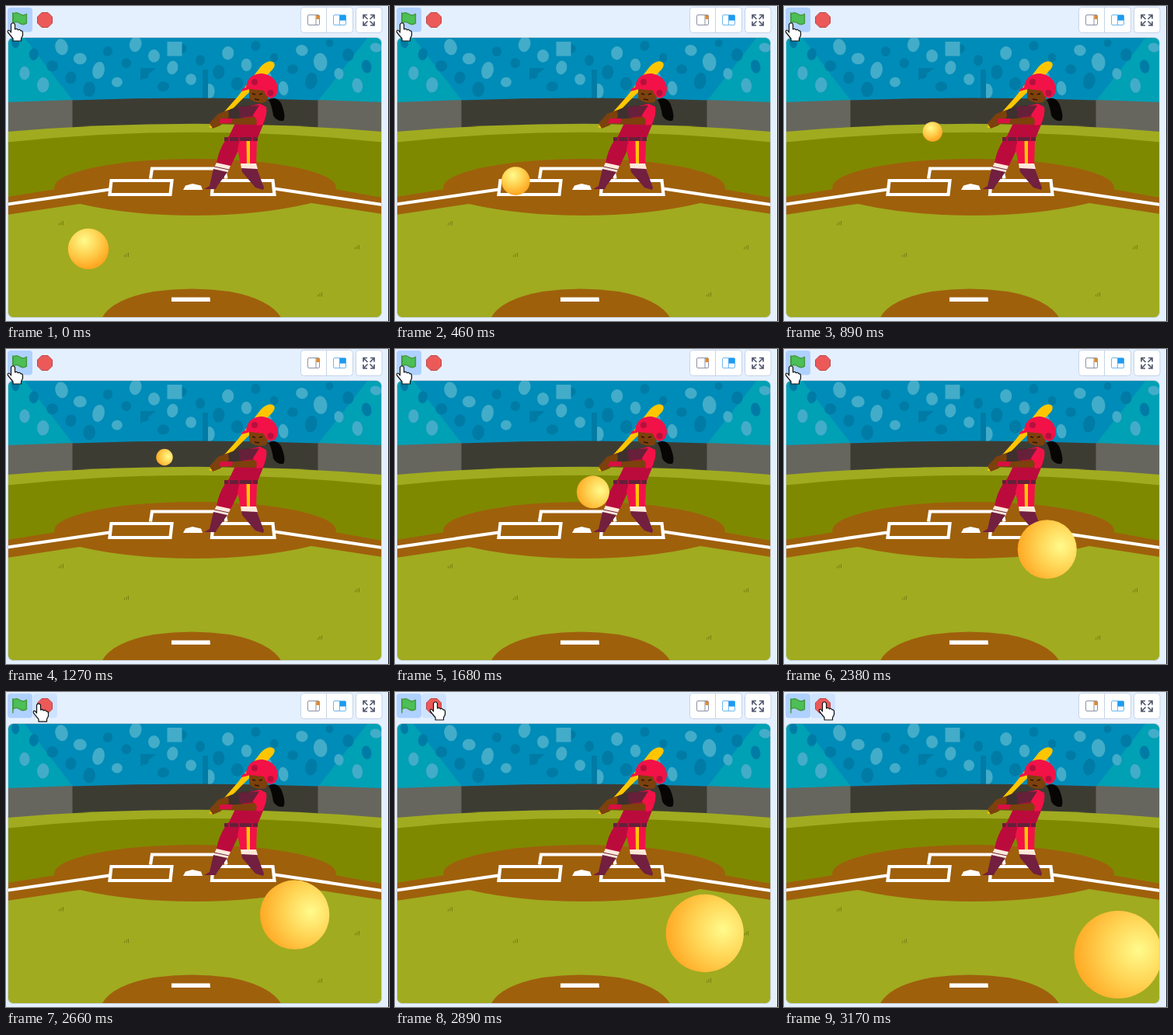
These frames come from a looping animation (493x406 px, 3220 ms). An HTML page:

```html
<!DOCTYPE html>
<html lang="en">
<head>
<meta charset="utf-8">
<title>Baseball stage</title>
<style>
html, body { margin: 0; width: 100%; height: 100%; overflow: hidden; background: #e5f0ff; }
svg { display: block; }
</style>
</head>
<body>
<svg width="493" height="406" viewBox="0 0 493 406">
  <defs>
    <clipPath id="stage"><rect x="2.5" y="41" width="481" height="360.5" rx="7"/></clipPath>
    <radialGradient id="glow">
      <stop offset="0" stop-color="#fffb8c"/>
      <stop offset=".5" stop-color="#ffd454"/>
      <stop offset="1" stop-color="#ffa722"/>
    </radialGradient>
    <path id="tuft" d="M-2.5 0v2.500M0-2v4.500M2.500-3v5.500" stroke="#6e7310" stroke-width=".8"/>
  </defs>
  <rect width="493" height="406" fill="#e5f0ff"/>
  <path d="M492.5 0V406" stroke="#15181d"/>

  <!-- toolbar -->
  <rect x="2" y="2" width="32" height="31.5" rx="4" fill="#afd1ff"/>
  <rect id="hover" x="34.5" y="2" width="31.5" height="31.5" rx="4" fill="#cee3ff"/>
  <g transform="translate(8 8) scale(1.14)" fill="#4cbf56" stroke="#45993d" stroke-width="1.3" stroke-linecap="round" stroke-linejoin="round">
    <path d="M.75 2A6.440 6.440 0 0 1 8.440 2A6.440 6.440 0 0 0 16.130 2V12.400A6.440 6.440 0 0 1 8.440 12.400A6.440 6.440 0 0 0 .75 12.400z"/>
    <path d="M.75 .75V16.500"/>
  </g>
  <path d="M46 8.500h8l5.500 5.500v8L54 27.500h-8L40.500 22v-8z" fill="#ec5959" stroke="#b84848"/>
  <g fill="#fff" stroke="#c6d4e8">
    <rect x="379.500" y="1.500" width="67" height="33" rx="4"/>
    <rect x="450.500" y="1.500" width="33.500" height="33" rx="4"/>
    <path d="M412.500 2V34"/>
  </g>
  <rect x="388.500" y="11.500" width="15" height="13" rx="1.500" fill="#fff" stroke="#8b92a5"/>
  <path d="M399 12v12" stroke="#8b92a5"/>
  <path d="M399.500 12h4v5h-4z" fill="#e08a2c"/>
  <rect x="421.500" y="11.500" width="16" height="13" rx="1.500" fill="#fff" stroke="#6db9ef"/>
  <path d="M429.500 12v12.500M429.500 18h8" stroke="#6db9ef"/>
  <path d="M429.500 12h8v6.500h-8z" fill="#1d9bf0"/>
  <path d="M460 16.500V11.500h5M460.500 12l5 5M474 16.500V11.500h-5M473.500 12l-5 5M460 20V25h5M460.500 24.500l5-5M474 20V25h-5M473.500 24.500l-5-5" fill="none" stroke="#535a70" stroke-width="1.700"/>

  <g clip-path="url(#stage)">
    <!-- stands and walls -->
    <rect x="2" y="40" width="482" height="130" fill="#008cb8"/>
    <path d="M2 40H23L87 123 2 128zM484 40H466L401 123 484 128z" fill="#00a0b5"/>
    <g id="crowd"></g>
    <path d="M173 80h20l-20 16zM253 82h7v38h-7z" fill="#007ba5"/>
    <path d="M207.500 46h19v18.500h-19z" fill="#43acc9"/>
    <path d="M2 124L86 121V170H2zM484 124L401 121V170H484z" fill="#66665e"/>
    <path d="M85.500 121.500Q243 115.500 401.500 121.500V170H85.500z" fill="#3d3c33"/>

    <!-- field -->
    <path d="M2 162Q243 141.500 484 162V402H2z" fill="#a0ab20"/>
    <path d="M2 175.500Q243 150 484 175.500V260H2z" fill="#7f8900"/>
    <path d="M2 246L64 236 423 236 484 247V300H2z" fill="#9f600b"/>
    <ellipse cx="243.500" cy="234" rx="181.500" ry="37" fill="#9f600b"/>
    <path d="M2 269L95 255Q160 270 243 270T393 254L484 268V402H2z" fill="#a0ab20"/>
    <path d="M123 403Q135 378 190 368 239 361 288 368 341 378 355 403z" fill="#9f600b"/>
    <g fill="none" stroke="#fff" stroke-width="4.200">
      <path d="M2 255.500L133 236.500M346 235.500L484 256"/>
      <path d="M135.500 225H213.500L211.500 243H133.500zM266.500 225H343.500L345.500 243H265z"/>
      <path d="M186 222.500L188 209.500H281L283.500 222.500"/>
    </g>
    <path d="M231 231.500L240 229 251 231.500 253 237H228zM213 375.500h49.500l.5 5.500H213z" fill="#fff"/>
    <use href="#tuft" x="71" y="280"/>
    <use href="#tuft" x="155" y="321"/>
    <use href="#tuft" x="452" y="311"/>
    <use href="#tuft" x="404" y="372"/>

    <!-- batter -->
    <path d="M338 121Q347 115 354 125 361 142 357 148 348 149 344 141 342 127 338 121z" fill="#080605"/>
    <path d="M261 156L268 151 298 117 328 78Q338 68 345 73 348 78 339 86L303 121 271 154 267 158z" fill="#ffc600"/>
    <path d="M313 106H337Q339 117 334 124 322 127 313 119z" fill="#7c410c"/>
    <path d="M281 137Q297 127 318 128L332 133 331 144 301 146 277 145z" fill="#3d302e"/>
    <path d="M312 129L326 126 335 130 333 148 324 170H286L296 149 306 143z" fill="#bb0b3d"/>
    <path d="M312 130L327 126 335 130Q337 140 330 153L323 154Q320 142 312 130z" fill="#f21247"/>
    <path d="M299 130L326 128 317 142 301 144z" fill="#672039"/>
    <path d="M274 147L320 143Q325 148 321 153L272 152z" fill="#7c410c"/>
    <path d="M262 151L273 139 286 134 287 143 276 154 266 158z" fill="#7c410c"/>
    <path d="M276 145H292L290 151H274z" fill="#d80f42"/>
    <path d="M309 105Q311 87 330 87 348 90 350 106 350 117 341 119 334 117 332 109L314 107 303 110Q304 105 309 105z" fill="#f21247"/>
    <g fill="#b5103d"><circle cx="320" cy="98" r="4"/><circle cx="340.500" cy="112" r="4"/></g>
    <path d="M317 113l4 1M326 114l4-1M320 120l6 1" stroke="#2b1406" stroke-width="1.300"/>
    <path d="M283 172H306L300 184 289 207 271 203Q273 187 283 172z" fill="#bb0b3d"/>
    <path d="M301 172H323L322 204H302L298 184z" fill="#f21247"/>
    <path d="M309.500 174h4.500V206h-4z" fill="#ffc600"/>
    <path d="M281 169H324V174H281z" fill="#642039"/>
    <path d="M287 168v6M300 168v6M317 168v6" stroke="#bb0b3d" stroke-width="2"/>
    <path d="M271 202L289 206 285 215 267 210zM302 203H322L324 210 303 210z" fill="#fde9da"/>
    <path d="M267 210L285 214 272 232 270 236H255L262 232zM303 209L323 210 332 234 331 237 321 234 304 214z" fill="#721f40"/>
    <path d="M268 207L287 211" stroke="#721f40"/>

    <circle id="ball" fill="url(#glow)"/>
  </g>
  <rect x="2.500" y="40.500" width="481" height="361" rx="7" fill="none" stroke="#c9d5df"/>
  <path id="hand" d="M-2.500 1.500Q0-2 2.500 1.500V8Q5 6.500 6.500 8.800 9 7.500 10 10 12.500 9.500 12.500 12.500V16L10.500 20V23H0V20L-6.500 12Q-7.500 8.500-4.500 9.500L-2.500 12z" fill="#fff" stroke="#111" stroke-width="1.200" stroke-linejoin="round"/>
</svg>
<script>
const $ = id => document.getElementById(id);
const LOOP = 3220, STEPS = 69;
const TURN = 27, LAST = STEPS - 1;

function set(id, values) {
  for (const key in values) $(id).setAttribute(key, values[key]);
}

// spectators: evenly spread, every other one light, with seeded random sizes
function crowd() {
  let seed = 7, out = '';
  const random = () => (seed = seed * 16807 % 2147483647) / 2147483647;
  for (let i = 0; i < 40; i++) {
    const isLight = i % 2, x = 12 + i * 11.9, y = 47 + i * .618 % 1 * 64;
    const rx = (isLight ? 6 : 5) + random() * 3, ry = rx * (.8 + random() * .7);
    out += `<ellipse rx="${rx}" ry="${ry}" fill="${isLight ? '#43acc9' : '#007ba5'}"
      transform="translate(${x} ${y}) rotate(${random() * 30 - 15})"/>`;
  }
  return out;
}

// glides from one pose to another between two steps; power above 1 slows towards the end
function glide(from, to, n, first, last, power) {
  const u = Math.min(1, Math.max(0, (n - first) / (last - first)));
  const k = 1 - (1 - u) ** power;
  return from.map((v, i) => v + (to[i] - v) * k);
}

const near = [106, 313, 26.2], far = [204, 139.5, 10.7], exit = [430, 338.5, 56.5];
const start = performance.now();

function draw(now) {
  const t = Math.max(0, now - start) % LOOP;
  const n = Math.min(LAST, Math.floor(t / LOOP * STEPS + .15));
  const away = n < TURN;
  const [cx, cy, r] = away ? glide(near, far, n, 0, 24, 1.3) : glide(far, exit, n, TURN, LAST, 1.03);
  const [hx, hy] = glide([9, 22], [52, 13], n, 51, 62, 1.85);
  set('ball', { cx, cy, r });
  // the highlight turns with the flight direction
  set('glow', away ? { cx: .4, cy: .3, r: .68 } : { cx: .73, cy: .45, r: .75 });
  set('hand', { transform: `translate(${hx} ${hy})` });
  set('hover', { visibility: hx > 34 ? 'visible' : 'hidden' });
  requestAnimationFrame(draw);
}

$('crowd').innerHTML = crowd();
draw(start);
</script>
</body>
</html>
```
